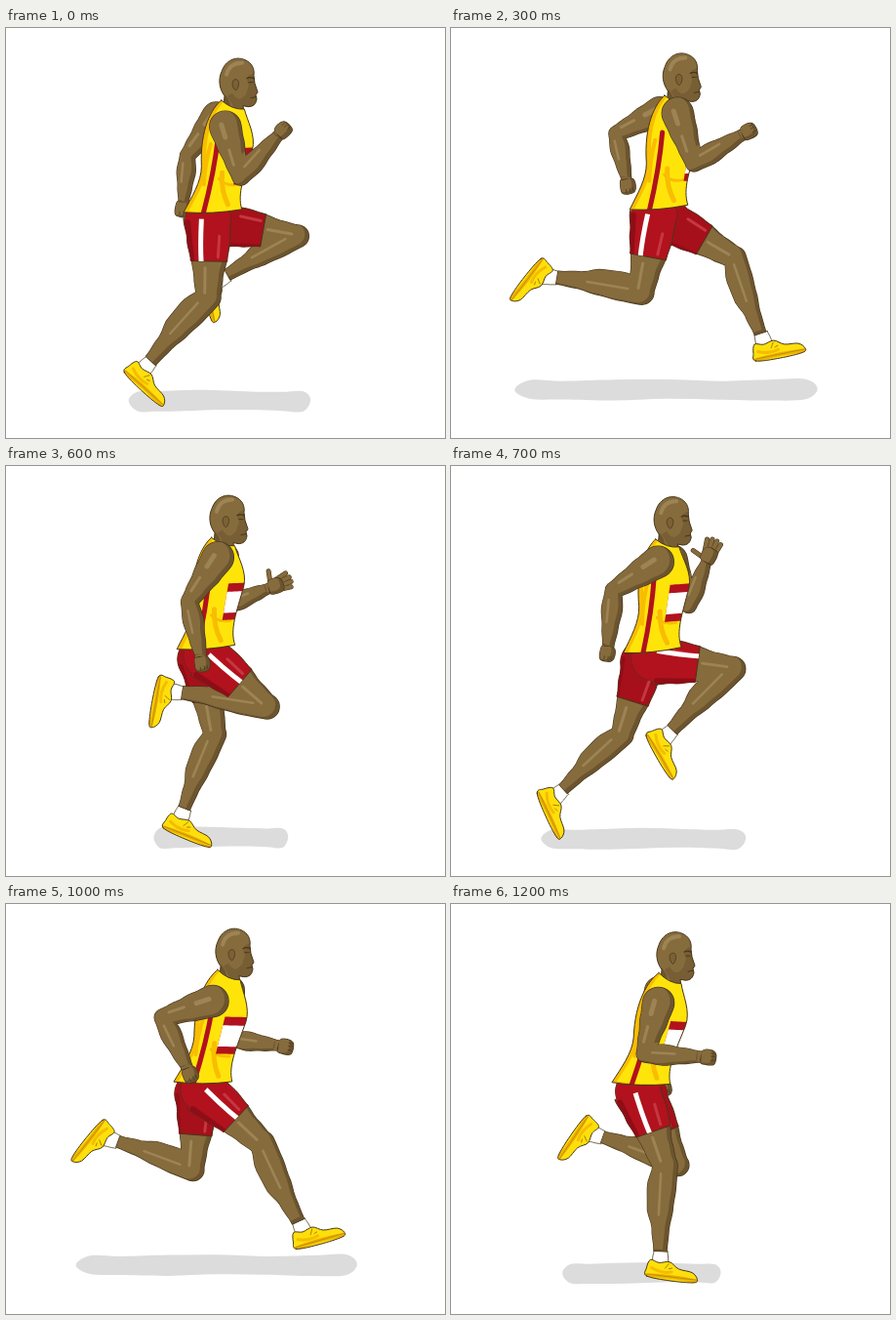
An HTML page with a canvas that plays this animation: 450 px wide and 420 px high, repeating every 1300 ms.

```html
<!DOCTYPE html>
<html lang="en">
<head>
<meta charset="utf-8">
<title>Runner</title>
<style>
html, body { margin: 0; width: 100%; height: 100%; overflow: hidden; background: #fff; }
canvas { display: block; }
</style>
</head>
<body>
<canvas id="stage" width="450" height="420"></canvas>
<script>
const ctx = document.getElementById('stage').getContext('2d');
const LOOP = 1300, HALF = LOOP / 2, STEP = 100;
const INK = '#46361a';
const SKIN = { lit: '#866b3d', dark: '#6b542e', shine: '#9d8455' };
const RED = '#b1121d', YELLOW = '#ffe40a', ORANGE = '#f8bd00';

// Limb angles over one stride, in degrees from straight down, forwards positive.
// The far side follows the same stride half a loop later.
const strideTimes = [0, 100, 250, 400, 550, 600, 650, 900, 1000, 1200];
const stride = {
  thigh: [-1, -29, -16, 2, 24, 49, 80, 71, 47, 19],
  shin:  [-42, -51, -88, -117, -110, -99, -61, 6, 25, -3],
  foot:  [48, 4, -33, -38, -34, -10, 14, 90, 106, 83],
  upper: [17, 29, 29, -9, -21, -33, -48, -87, -72, -15],
  fore:  [138, 169, 150, 51, 20, 12, -5, 4, 26, 87]
};
const bodyTimes = [0, 100, 400, 600, 900, 1000, 1200];
const headX = [0, -5, -1, -10, -9, -4, -8];
const hemX = [212, 218, 210, 205, 210, 202, 195];

const near = { thigh: 80, shin: 88, upper: 54, fore: 65, size: 1, swing: 1 };
const far = { thigh: 78, shin: 82, upper: 50, fore: 55, size: .9, swing: .75 };

const wave = (t, peak, period = LOOP) => Math.cos((t - peak) / period * 2 * Math.PI);

// Looping cubic through the key times.
function ease(keys, values, time) {
  const n = keys.length, t = time % LOOP;
  let i = n - 1;
  while (keys[i] > t) i--;
  const at = k => keys[(k + n) % n] + Math.floor(k / n) * LOOP;
  const val = k => values[(k + n) % n];
  const h = at(i + 1) - at(i), s = (t - at(i)) / h;
  const slope = k => (val(k + 1) - val(k - 1)) / (at(k + 1) - at(k - 1)) * h;
  const p = val(i), q = val(i + 1), m = slope(i), w = slope(i + 1);
  return p + s * (m + s * (3 * (q - p) - 2 * m - w + s * (2 * (p - q) + m + w)));
}

const mix = (a, b, s) => [a[0] + (b[0] - a[0]) * s, a[1] + (b[1] - a[1]) * s];
const add = (a, x, y) => [a[0] + x, a[1] + y];
const swing = (a, len, deg) =>
  add(a, len * Math.sin(deg * Math.PI / 180), len * Math.cos(deg * Math.PI / 180));

// Local frame at a: x along the line to b, y towards its left.
function frame(a, b) {
  const len = Math.hypot(b[0] - a[0], b[1] - a[1]);
  const u = [(b[0] - a[0]) / len, (b[1] - a[1]) / len];
  return (x, y) => add(a, u[0] * x + u[1] * y, u[1] * x - u[0] * y);
}

function blob(pts) {
  const p = new Path2D(), n = pts.length, at = i => pts[(i + n) % n];
  p.moveTo(...pts[0]);
  for (let i = 0; i < n; i++) {
    const [a, b, c, d] = [at(i - 1), at(i), at(i + 1), at(i + 2)];
    p.bezierCurveTo(b[0] + (c[0] - a[0]) / 6, b[1] + (c[1] - a[1]) / 6,
      c[0] - (d[0] - b[0]) / 6, c[1] - (d[1] - b[1]) / 6, ...c);
  }
  p.closePath();
  return p;
}

// Flat-ended tube with its own width profile on each side.
function tube(a, b, size, front, back = front) {
  const at = frame(a, b), len = Math.hypot(b[0] - a[0], b[1] - a[1]), steps = 15, p = new Path2D();
  const put = (i, list, sign) => {
    const k = i / steps * (list.length - 1), j = Math.min(Math.floor(k), list.length - 2), f = k - j;
    const w = list[j] + (list[j + 1] - list[j]) * f * f * (3 - 2 * f);
    p.lineTo(...at(len * i / steps, sign * w * size));
  };
  for (let i = 0; i <= steps; i++) put(i, front, 1);
  for (let i = steps; i >= 0; i--) put(i, back, -1);
  p.closePath();
  return p;
}

function disc(c, r) {
  const p = new Path2D();
  p.arc(...c, r, 0, Math.PI * 2);
  return p;
}

function paint(path, fill, line = 1) {
  ctx.fillStyle = fill;
  ctx.fill(path);
  if (line) outline(path, line);
}

function outline(path, width) {
  ctx.strokeStyle = INK;
  ctx.lineWidth = width;
  ctx.stroke(path);
}

function stroke(pts, color, width) {
  ctx.beginPath();
  ctx.moveTo(...pts[0]);
  ctx.quadraticCurveTo(...pts[1], ...pts[pts.length - 1]);
  ctx.strokeStyle = color;
  ctx.lineWidth = width;
  ctx.stroke();
}

function within(path, draw) {
  ctx.save();
  ctx.clip(path);
  draw();
  ctx.restore();
}

// Joined skin parts share one outline, a dark edge and highlights.
function flesh(parts, shines) {
  const whole = new Path2D();
  parts.forEach(p => whole.addPath(p));
  outline(whole, 1.4);
  paint(whole, SKIN.dark, 0);
  within(whole, () => {
    ctx.translate(-4, -2);
    paint(whole, SKIN.lit, 0);
    shines.forEach(([a, b, from, to, w]) => stroke([mix(a, b, from), mix(a, b, to)], SKIN.shine, w));
  });
}

function pose(side, t, hip, shoulder) {
  const phase = side === near ? t : t + HALF;
  const angle = part => ease(strideTimes, stride[part], phase);
  const thigh = angle('thigh'), shin = angle('shin'), fore = angle('fore');
  const knee = swing(hip, side.thigh, thigh), ankle = swing(knee, side.shin, shin);
  const collar = swing(ankle, 15, shin);
  const heel = frame(collar, swing(collar, 50, angle('foot')))(-12.5, -13);
  const elbow = swing(shoulder, side.upper, angle('upper') * side.swing);
  return { side, thigh, hip, knee, ankle, collar, heel, toe: swing(heel, 51, angle('foot')),
    shoulder, elbow, hand: swing(elbow, side.fore, fore) };
}

function shoe({ ankle, collar, heel, toe }) {
  const at = frame(heel, toe);
  paint(tube(ankle, collar, 1, [7, 8, 9]), '#fff', .8);
  const body = blob([at(0, 1), at(-1, 9), at(2, 18), at(11, 16), at(22, 18), at(32, 12),
    at(46, 10), at(52, 4), at(49, 0), at(25, -1)]);
  paint(body, '#ffdf0b', 0);
  within(body, () => {
    stroke([at(-5, 1), at(25, 5), at(56, 1)], '#eeb200', 4);
    stroke([at(4, 10), at(15, 5), at(25, 8)], '#f4bd00', 3);
    stroke([at(0, 3), at(54, 3)], '#9a7600', .6);
  });
  [21, 25].forEach(x => stroke([at(x, 37 - x), at(x - 3, 11)], '#a57c00', 1));
  outline(body, 1);
}

function leg(p) {
  const { hip, knee, ankle, side: { size } } = p;
  shoe(p);
  flesh([
    tube(hip, knee, size, [20, 20, 18, 14, 12], [22, 20, 18, 15, 12.5]),
    disc(knee, 12.5 * size),
    tube(knee, ankle, size, [12.5, 12, 10, 7, 6], [12.5, 17, 16, 10, 7])
  ], [[hip, knee, .65, .97, 3], [knee, ankle, .12, .6, 2.5]]);
}

function shorts({ side, hip, knee, thigh }) {
  const end = mix(hip, knee, .54), len = side.thigh * .54, at = frame(hip, end);
  const cloth = tube(hip, end, side.size, [21, 21, 18.5], [27, 23, 19]);
  const color = side === near ? RED : '#a5101b';
  const seat = disc(add(hip, -2, 0), 23);
  paint(seat, color);
  paint(cloth, color);
  paint(seat, color, 0);
  within(cloth, () => {
    stroke([at(4, -23), at(len, -18)], '#8f0d17', 6);
    stroke([at(len * .4, 10), at(len * .9, 9)], '#c53741', 3);
    if (side === near) {
      const y = Math.max(0, thigh) * .2 - 8;
      stroke([at(-14, y), at(len / 2, y - 2), at(len + 3, y)], '#fff', 5);
    }
  });
}

function arm({ side, shoulder, elbow, hand }, spread) {
  const { size } = side, at = frame(hand, add(hand, hand[0] - elbow[0], hand[1] - elbow[1]));
  const wrist = at(-7, 0);
  if (spread > .25) {
    const fingers = [-7, -2, 3, 8].map((y, i) => [at(2, y * .7), at(9 + 9 * spread - Math.abs(i - 1.5) * 2, y)]);
    fingers.push([at(-4, 4), at(-1, 9 + 8 * spread)]);
    fingers.forEach(f => stroke(f, INK, 5));
    fingers.forEach(f => stroke(f, SKIN.lit, 4));
  }
  const fist = blob([at(-8, -5), at(-2, -7.5), at(6, -7), at(8, -1), at(7, 5), at(1, 7.5), at(-6, 6)]);
  flesh([
    disc(shoulder, 16 * size),
    tube(shoulder, elbow, size, [16, 14, 11, 8.5]),
    disc(elbow, 8.5 * size),
    tube(elbow, wrist, size, [8.5, 10.5, 8, 5.5]),
    fist
  ], [[shoulder, elbow, 0, .25, 5], [shoulder, elbow, .5, .8, 3], [elbow, wrist, .2, .6, 2.5]]);
  if (spread <= .25) [-3, 1, 4].forEach(y => stroke([at(3, y), at(6.5, y)], INK, .7));
}

const skull = new Path2D('M222 94L224 68C219 61 217 52 221 43C225 31 236 27 245 31C252 34 255 40 254 47L255 55L258 64L256 67L257 71C256 77 253 79 248 79L243 78L245 94Z');
const face = new Path2D('M254 45C247 45 246 52 249 57L246 66C241 73 236 72 232 65L227 68L240 91L246 94L244 79L253 79L258 70Z');
const ear = new Path2D('M234 61C231 57 231 51 236 51C240 52 239 59 236 62Z');

function head(x, y) {
  ctx.save();
  ctx.translate(x, y);
  paint(skull, SKIN.lit, 0);
  within(skull, () => {
    paint(face, '#775e34', 0);
    stroke([[226, 46], [229, 34], [242, 34]], SKIN.shine, 4);
    stroke([[224, 69], [231, 78], [226, 92]], SKIN.dark, 4);
  });
  paint(ear, '#7b6135', .7);
  stroke([[247, 50], [250, 48], [254, 50]], INK, 1.3);
  stroke([[249, 54], [253, 54]], INK, 1);
  stroke([[251, 70], [256, 69]], INK, 1);
  outline(skull, 1);
  ctx.restore();
}

function jersey(hem, neck, twist) {
  const len = Math.hypot(neck[0] - hem[0], neck[1] - hem[1]), local = frame(hem, neck);
  const at = (x, y) => local(y * len, -x);
  const shape = new Path2D();
  shape.moveTo(...at(-13, 1.02));
  shape.bezierCurveTo(...at(-21, .93), ...at(-29, .72), ...at(-20, .38));
  shape.bezierCurveTo(...at(-17, .24), ...at(-24, .08), ...at(-29, -.07));
  shape.quadraticCurveTo(...at(0, -.04), ...at(29, .06));
  shape.bezierCurveTo(...at(21, .2), ...at(25, .36), ...at(28, .62));
  shape.bezierCurveTo(...at(29, .76), ...at(17, .88), ...at(12, .98));
  shape.quadraticCurveTo(...at(0, .95), ...at(-13, 1.02));
  shape.closePath();
  paint(shape, ORANGE, 0);
  within(shape, () => {
    ctx.save();
    ctx.translate(5, -1);
    paint(shape, YELLOW, 0);
    ctx.restore();
    stroke([at(2, .36), at(4, .2), at(14, .08)], ORANGE, 5);
    stroke([at(20, .28), at(8, .24), at(0, .3)], ORANGE, 3);
    stroke([at(-15, .6), at(-17, .4), at(-14, .22)], ORANGE, 4);
    const band = (top, bottom, color) =>
      paint(blob([[0, top], [40, top + .08], [40, bottom + .08], [0, bottom]]
        .flatMap(([x, y]) => Array(3).fill(at(twist + x, y)))), color, 0);
    band(.62, .27, RED);
    band(.54, .34, '#fff');
    stroke([at(-9, .68), at(-6, .35), at(-9, -.05)], RED, 5);
  });
  outline(shape, 1);
}

// The shadow spans the widest reach of feet, knees and hands.
function ground(sides, t) {
  const left = Math.min(...sides.flatMap(p => [p.heel[0], p.toe[0]])) + 5;
  const right = Math.max(...sides.flatMap(p => [p.toe[0], p.knee[0], p.hand[0]])) + 13;
  const y = 376 + 6 * wave(t, 25, HALF), ripple = x => 10 + Math.sin(x / 25);
  const xs = [.05, .16, .33, .5, .67, .84, .96].map(s => left + (right - left) * s);
  paint(blob([[left, y], ...xs.map(x => [x, y - ripple(x)]), [right, y - 1],
    ...xs.reverse().map(x => [x, y + ripple(x + 40)])]), '#dcdcdc', 0);
}

function draw(t) {
  const sway = wave(t, 150), hipY = 193.5 + 4 * wave(t, 100, HALF);
  const hx = ease(bodyTimes, headX, t), hy = 3.2 * wave(t, 50, HALF) - 1.2;
  const hem = [ease(bodyTimes, hemX, t), hipY - 9], neck = [233 + hx, 77 + hy];
  const front = pose(near, t, [hem[0] - 4 * sway, hipY],
    add(neck, 9 * wave(t, 330) - 8, 20 - 7 * wave(t, 400)));
  const rear = pose(far, t, [hem[0] + 2 + 11 * sway, hipY + 4],
    add(neck, -7 - 14 * sway, 14 - 3 * sway));

  ctx.fillStyle = '#fff';
  ctx.fillRect(0, 0, 450, 420);
  ctx.lineCap = ctx.lineJoin = 'round';
  ground([front, rear], t);
  arm(rear, wave(t, 680));
  [rear, front].forEach(p => { leg(p); shorts(p); });
  head(hx, hy);
  jersey(hem, neck, 13 + 8 * wave(t, 250));
  arm(front, 0);
}

const start = performance.now();
function tick(now) {
  const t = Math.max(0, now - start) % LOOP;
  draw(Math.floor(t / STEP) * STEP);
  requestAnimationFrame(tick);
}
draw(0);
requestAnimationFrame(tick);
</script>
</body>
</html>
```
